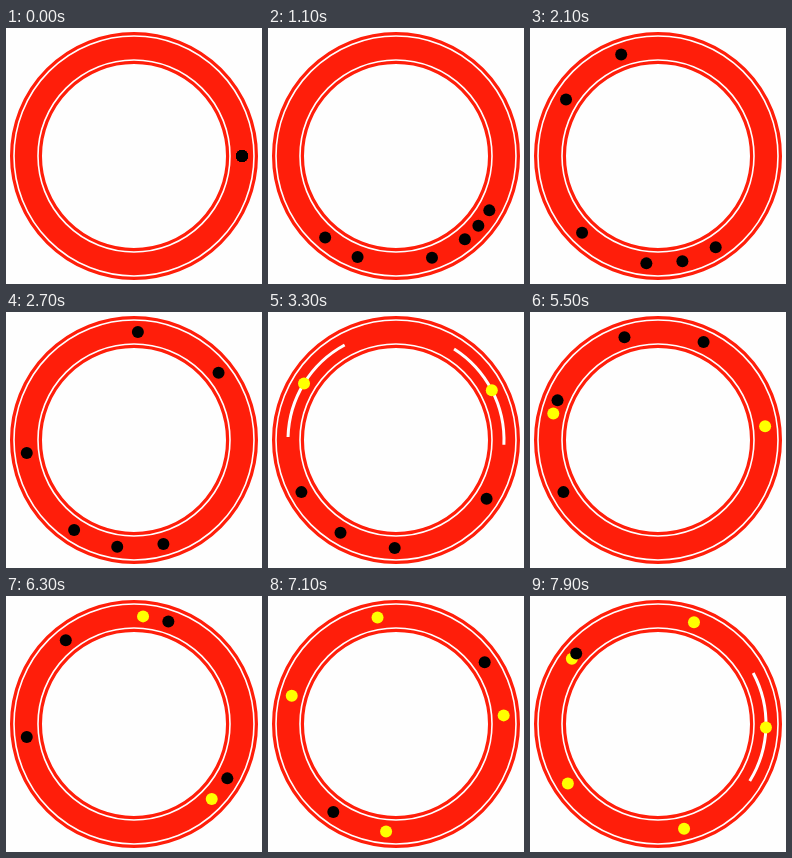
An HTML page with a canvas that plays this animation: 256x256 px, repeating every 8000 ms.

```html
<!DOCTYPE html>
<html>
<head>
<meta charset="utf-8">
<style>
html, body { margin: 0; height: 100%; overflow: hidden; background: #fefefe; }
canvas { display: block; }
</style>
</head>
<body>
<canvas id="stage" width="256" height="256"></canvas>
<script>
const ctx = document.getElementById('stage').getContext('2d');
const TURN = 2 * Math.PI;
const SPEEDS = [3, 4, 5, 7, 11, 13];
const STEP = 1 / 393;      // turns per step for a runner of speed 1
const STEPS = 80, STEP_MS = 100;
const ARC_STEPS = 5;       // how long the arc of a newly lonely runner stays
const LANE = 108;

// A runner is lonely when all others are at least 1/6 turn away.
function isLonely(speed, step) {
  return SPEEDS.every(other => {
    if (other === speed) return true;
    const gap = Math.abs(other - speed) * step * STEP % 1;
    return Math.min(gap, 1 - gap) >= 1 / 6;
  });
}

function firstLonely(speed) {
  for (let i = 0; i < STEPS; i++) if (isLonely(speed, i)) return i;
  return Infinity;
}

const runners = SPEEDS.map(speed => ({ speed, first: firstLonely(speed) }));

function arc(radius, width, color, from = 0, to = TURN) {
  ctx.beginPath();
  ctx.arc(128, 128, radius, from, to);
  ctx.lineWidth = width;
  ctx.strokeStyle = color;
  ctx.stroke();
}

function draw(step) {
  ctx.fillStyle = '#fefefe';
  ctx.fillRect(0, 0, 256, 256);
  arc(LANE, 32, '#ff1e0a');
  arc(120, 1.6, '#fff');
  arc(96, 1.6, '#fff');

  for (const { speed, first } of runners) {
    const angle = speed * step * STEP * TURN;
    if (step >= first && step < first + ARC_STEPS)
      arc(LANE, 3, '#fff', angle - TURN / 12, angle + TURN / 12);
    ctx.beginPath();
    ctx.arc(128 + LANE * Math.cos(angle), 128 + LANE * Math.sin(angle), 6, 0, TURN);
    ctx.fillStyle = step >= first ? '#ff0' : '#000';
    ctx.fill();
  }
}

function tick() {
  draw(Math.floor(performance.now() / STEP_MS) % STEPS);
  requestAnimationFrame(tick);
}
tick();
</script>
</body>
</html>
```
